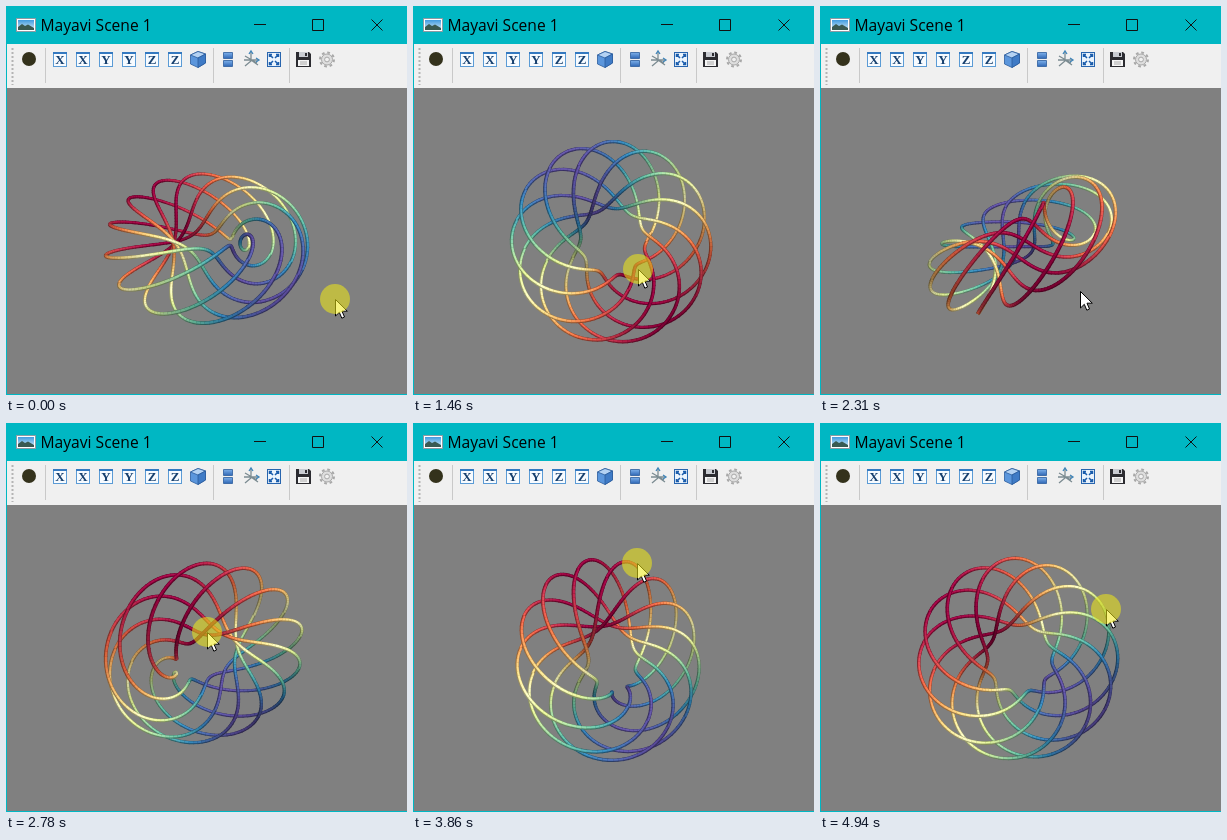
An HTML page with a canvas for the animation above (5020 ms loop, 401 by 389 pixels).

```html
<!DOCTYPE html>
<html lang="en">
<head>
<meta charset="utf-8">
<title>Mayavi Scene 1</title>
<style>
html, body { margin: 0; width: 100%; height: 100%; overflow: hidden; background: #808080; }
svg, canvas { position: absolute; left: 0; top: 0; width: 401px; height: 389px; display: block; }
</style>
</head>
<body>
<svg viewBox="0 0 401 389">
  <defs>
    <linearGradient id="sky" x2="0" y2="1"><stop stop-color="#3f9be0"/><stop offset="1" stop-color="#d8ecf8"/></linearGradient>
    <linearGradient id="blue" x2="0" y2="1"><stop stop-color="#7db0ea"/><stop offset="1" stop-color="#2f67b5"/></linearGradient>
  </defs>
  <rect width="401" height="389" fill="#00b7c3"/>
  <rect x="1" y="38" width="400" height="350" fill="#808080"/>
  <rect x="1" y="38" width="400" height="44" fill="#f0f0f0"/>
  <g>
    <rect x="10.5" y="12.5" width="19" height="13" fill="#fff" stroke="#8d9aa3"/>
    <rect x="12" y="14" width="16" height="10" fill="url(#sky)"/>
    <path d="M12 24V21L16 18L19 20L22 18.5L28 22V24Z" fill="#3a5a52"/>
  </g>
  <text x="34.5" y="25" font-family="'Open Sans', 'Noto Sans', sans-serif" font-size="15.6">Mayavi Scene 1</text>
  <path d="M248 18.5H260M306.5 13.5H317.5V24.5H306.5ZM365.5 13.5L376.5 24.5M376.5 13.5L365.5 24.5" fill="none" stroke="#111"/>
  <path d="M6.5 42V79" stroke="#b4b4b4" stroke-width="2" stroke-dasharray="2 2"/>
  <path d="M39.5 42V77M207.5 42V77M283.5 42V77" stroke="#c9c9c9"/>
  <circle cx="23" cy="53" r="7" fill="#34321c"/>
  <g id="views"></g>
  <g stroke="#2c5d9e" stroke-width=".8" stroke-linejoin="round">
    <path d="M184.5 49L192 45.5L199.5 48V57L192 61.5L184.5 58Z" fill="#5b96dc"/>
    <path d="M184.5 49L192 45.5L199.5 48L192 52Z" fill="#b4d2f3"/>
    <path d="M192 52L199.5 48V57L192 61.5Z" fill="#3f7bc6"/>
    <rect x="217.5" y="46.5" width="9" height="6" fill="url(#blue)"/>
    <rect x="217.5" y="54.5" width="9" height="6" fill="url(#blue)"/>
  </g>
  <g fill="none">
    <path d="M245 46V55L239 60M245 54L252 59M239 50L251 57M238 54H252" stroke="#7b8b91" stroke-width="1.3"/>
    <path d="M243 48L245 45L247 48M250 56L253 54L250 52" stroke="#3d83b8" stroke-width="1.3"/>
    <rect x="261.5" y="46.5" width="13" height="14" fill="#eaf3fc" stroke="#2865ae"/>
    <path d="M263.5 51V48.5H266M270 48.5H272.5V51M272.5 56V58.5H270M266 58.5H263.5V56M264 49L267 52M272 49L269 52M264 58L267 55M272 58L269 55" stroke="#1b5dac" stroke-width="1.5"/>
  </g>
  <path d="M290 46H303L305 48V61H290Z" fill="#2c2c31"/>
  <path d="M293 46H302V51H293Z" fill="#c9ccd2"/>
  <path d="M299 47H301V50H299Z" fill="#2c2c31"/>
  <path d="M292 54H303V60H292Z" fill="#f5f5f5"/>
  <path d="M294 56H301M294 58H301" stroke="#aaa"/>
  <g fill="none" stroke="#a8a8a8">
    <circle cx="321" cy="53.5" r="7" stroke-width="2" stroke-dasharray="2.75 2.75"/>
    <circle cx="321" cy="53.5" r="5.5" fill="#dedede"/>
    <circle cx="321" cy="53.5" r="2.4" fill="#f0f0f0"/>
  </g>
</svg>
<canvas id="scene"></canvas>
<script>
const LOOP = 5020, BEATS = 65, STEP = LOOP / BEATS;
const CX = 200.5, CY = 235.5, FOCAL = 569, DIST = 8.5;
const SEGS = 900, TAU = Math.PI * 2;
const LIGHT = [0.3, 0.62, 0.72];
const DEG_PER_PX = 0.5;
const SPECTRAL = '9e0142 d53e4f f46d43 fdae61 fee08b ffffbf e6f598 abdda4 66c2a5 3288bd 5e4fa2'
  .split(' ').map(h => [0, 2, 4].map(i => parseInt(h.substr(i, 2), 16)));

// pointer place; pose as heading, tilt, red side, visible face; swing of the drag that follows
const KEYS = [
  { beat: 0, at: [329, 293], pose: [180, 53, -44, 1], swing: [0, 0] },
  { beat: 10, at: [181, 202], pose: [22, 45, -78, -1], swing: [-30, -50] },
  { beat: 19, at: [225, 263], pose: [110, 12, -167, -1], swing: [-60, -75] },
  { beat: 30, at: [260, 285], pose: [208.5, 77, 95, -1], swing: [0, 0] },
  { beat: 36, at: [201, 209], pose: [25, 38, 92, 1], swing: [-150, -25] },
  { beat: 50, at: [224, 140], pose: [100, 32, 10, 1], swing: [64, 15] },
  { beat: 64, at: [286, 186], pose: [105, 12, 40, -1], swing: [0, 0] }
];
for (const key of KEYS) key.turn = orient(...key.pose);

function mul([w, x, y, z], [a, b, c, d]) {
  return [w * a - x * b - y * c - z * d, w * b + x * a + y * d - z * c,
          w * c - x * d + y * a + z * b, w * d + x * c - y * b + z * a];
}
function spin(axis, deg) {
  const half = deg * TAU / 720, s = Math.sin(half) / Math.hypot(...axis);
  return [Math.cos(half), ...axis.map(v => v * s)];
}
function orient(heading, tilt, red, side) {
  const X = [1, 0, 0], Z = [0, 0, 1];
  const q = mul(mul(spin(Z, heading), spin(X, tilt)), spin(Z, red + 90 * side));
  return side > 0 ? q : mul(q, spin(X, 180));
}
// trackball: the near side of the knot follows the pointer
function drag([dx, dy]) {
  const px = Math.hypot(dx, dy);
  return px ? spin([dy, dx, 0], px * DEG_PER_PX) : [1, 0, 0, 0];
}
function slerp(p, q, k) {
  const dot = p.reduce((s, v, i) => s + v * q[i], 0);
  const sign = dot < 0 ? -1 : 1;
  const ang = Math.acos(Math.min(1, dot * sign)), s = Math.sin(ang);
  if (s < 1e-5) return p;
  const u = Math.sin((1 - k) * ang) / s, v = sign * Math.sin(k * ang) / s;
  return p.map((c, i) => c * u + q[i] * v);
}
function matrix([w, x, y, z]) {
  return [[1 - 2 * (y * y + z * z), 2 * (x * y - w * z), 2 * (x * z + w * y)],
          [2 * (x * y + w * z), 1 - 2 * (x * x + z * z), 2 * (y * z - w * x)],
          [2 * (x * z - w * y), 2 * (y * z + w * x), 1 - 2 * (x * x + y * y)]];
}
const dot3 = (a, b) => a[0] * b[0] + a[1] * b[1] + a[2] * b[2];

const knot = Array.from({ length: SEGS + 1 }, (_, i) => {
  const phi = i / SEGS * TAU, mu = 6 * phi, r = 1 + 0.5 * Math.cos(11 * phi);
  return [r * Math.cos(mu), r * Math.sin(mu), 0.5 * Math.sin(11 * phi)];
});
const tint = knot.map(p => {
  const v = (p[1] / Math.hypot(p[0], p[1]) + 1) * 5, i = Math.min(9, Math.floor(v));
  return SPECTRAL[i].map((c, j) => c + (SPECTRAL[i + 1][j] - c) * (v - i));
});
const shade = (c, k, add = 0) => `rgb(${c.map(v => Math.min(255, Math.round(v * k + add))).join()})`;

const canvas = document.getElementById('scene'), ctx = canvas.getContext('2d');
const ratio = window.devicePixelRatio || 1;
canvas.width = 401 * ratio;
canvas.height = 389 * ratio;

function line(a, b, width, color, dx, dy) {
  ctx.lineWidth = width;
  ctx.strokeStyle = color;
  ctx.beginPath();
  ctx.moveTo(a[0] + dx, a[1] + dy);
  ctx.lineTo(b[0] + dx, b[1] + dy);
  ctx.stroke();
}

function drawKnot(q) {
  const m = matrix(q);
  const pts = knot.map(p => m.map(row => dot3(row, p)));
  const flat = pts.map(p => {
    const s = FOCAL / (DIST - p[2]);
    return [CX + p[0] * s, CY - p[1] * s, s];
  });
  const order = Array.from({ length: SEGS }, (_, i) => i)
    .sort((i, j) => pts[i][2] + pts[i + 1][2] - pts[j][2] - pts[j + 1][2]);
  for (const i of order) {
    const d = pts[i + 1].map((v, k) => v - pts[i][k]);
    const along = dot3(d, LIGHT) / Math.hypot(...d);
    const lit = Math.sqrt(Math.max(0, 1 - along * along));
    const p = flat[i], r = flat[i + 1];
    const ux = r[0] - p[0], uy = r[1] - p[1], ul = Math.hypot(ux, uy) || 1;
    const ex = ux / ul * 0.35, ey = uy / ul * 0.35;
    const from = [p[0] - ex, p[1] - ey], to = [r[0] + ex, r[1] + ey];
    // shift the lit part of the tube towards the light
    let nx = -uy / ul, ny = ux / ul;
    if (nx * LIGHT[0] - ny * LIGHT[1] < 0) { nx = -nx; ny = -ny; }
    const w = 0.05 * p[2];
    line(from, to, w, shade(tint[i], 0.36 + 0.24 * lit), 0, 0);
    line(from, to, w * 0.62, shade(tint[i], 0.55 + 0.45 * lit), nx * 0.35, ny * 0.35);
    if (lit > 0.8) line(from, to, w * 0.2, shade(tint[i], 1, 120 * (lit - 0.8)), nx * 0.5, ny * 0.5);
  }
}

const ARROW = new Path2D('M.5 .5V17L4.3 13.3L6.8 19.2L9.5 18L7 12.2H12.3Z');
function drawPointer(x, y, pressed) {
  ctx.save();
  ctx.translate(x, y);
  ctx.fillStyle = '#fff';
  ctx.strokeStyle = '#000';
  ctx.lineWidth = 1;
  ctx.fill(ARROW);
  ctx.stroke(ARROW);
  if (pressed) {
    ctx.fillStyle = 'rgba(240,234,20,.55)';
    ctx.beginPath();
    ctx.arc(0, 0, 15, 0, TAU);
    ctx.fill();
  }
  ctx.restore();
}

function render(beat) {
  const i = Math.min(KEYS.length - 2, KEYS.findLastIndex(key => key.beat <= beat));
  const a = KEYS[i], b = KEYS[i + 1], k = (beat - a.beat) / (b.beat - a.beat);
  const swing = a.swing.map(v => v * Math.sin(Math.PI * k));
  const [x, y] = a.at.map((v, j) => v + (b.at[j] - v) * k + swing[j]);
  ctx.setTransform(ratio, 0, 0, ratio, 0, 0);
  ctx.clearRect(0, 0, 401, 389);
  drawKnot(mul(drag(swing), slerp(a.turn, b.turn, k)));
  drawPointer(x, y, beat < 27 || beat > 31);
}

document.getElementById('views').innerHTML = [...'XXYYZZ'].map((c, i) => {
  const x = 54 + 23 * i;
  return `<rect x="${x - 6.5}" y="46.5" width="13" height="14" fill="#f7fbff" stroke="#5b9bd5"/>
    <path d="M${x - 7} 47H${x + 7}" stroke="#3479c0" stroke-width="2"/>
    <text x="${x}" y="58" text-anchor="middle" font-family="'Liberation Serif', serif" font-weight="bold" font-size="13" fill="#17406f">${c}</text>`;
}).join('');

let last = -1;
function tick(now) {
  const beat = Math.min(BEATS - 1, Math.floor((now % LOOP + 13) / STEP));
  if (beat !== last) render(last = beat);
  requestAnimationFrame(tick);
}
tick(0);
</script>
</body>
</html>
```
